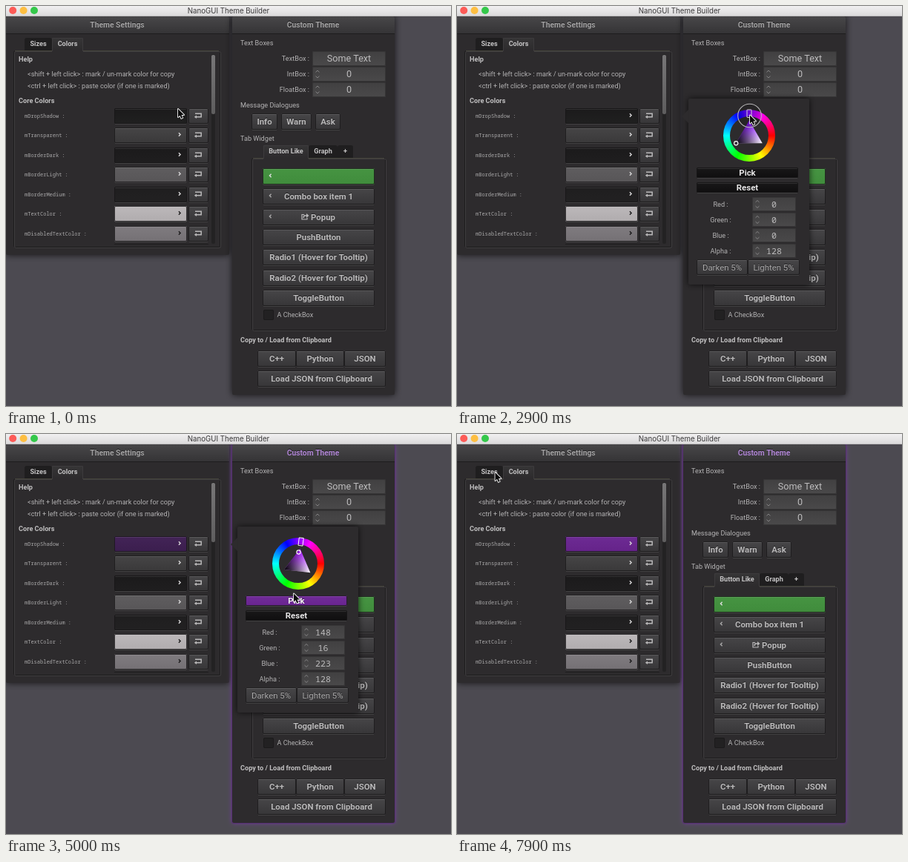
An HTML page with a canvas that plays this animation: 600x540 px, repeating every 8000 ms.

```html
<!DOCTYPE html>
<html lang="en">
<head>
<meta charset="utf-8">
<title>NanoGUI Theme Builder</title>
<style>
  html, body { margin: 0; width: 100%; height: 100%; overflow: hidden; background: #4c4a51; }
  canvas { display: block; width: 600px; height: 540px; }
</style>
</head>
<body>
<canvas id="stage"></canvas>
<script>
const LOOP = 8000, STEP = 100;
const SANS = 'Roboto, sans-serif', MONO = '"Noto Sans Mono", monospace', UI = 'Inter, sans-serif';
const canvas = document.getElementById('stage');
const c = canvas.getContext('2d');
const dpr = window.devicePixelRatio || 1;
canvas.width = 600 * dpr;
canvas.height = 540 * dpr;

// time, x, y of the pointer tip
const path = [
  [0, 232, 139], [400, 231.5, 147.5], [1200, 231.5, 147.5], [2200, 395, 147.5], [2900, 395, 147.5],
  [3500, 398, 148], [4000, 395.5, 161], [4300, 395.5, 161], [4500, 394.5, 159.5],
  [5000, 388, 215.5], [5300, 386, 220.5], [6400, 386, 220.5], [7700, 51.5, 52], [LOOP, 51.5, 52]
];
const presses = [[1000, 1300], [2800, 3600], [4200, 4600], [5300, 5500]];
const OPEN = 1000, HUE = 2800, PICK = 4300, CLOSE = 5500;
const WHEEL = { x: 394, y: 175, outer: 35, inner: 26, tri: 20.5 };

const within = (t, a, b) => t >= a && t < b;
const ease = u => u * u * (3 - 2 * u);

function pointerAt(t) {
  const i = Math.max(1, path.findIndex(p => p[0] > t));
  const [t0, x0, y0] = path[i - 1], [t1, x1, y1] = path[i];
  const u = ease((t - t0) / (t1 - t0));
  return [x0 + (x1 - x0) * u, y0 + (y1 - y0) * u];
}

function blend([x0, y0], [x1, y1], from, to) {
  const g = c.createLinearGradient(x0, y0, x1, y1);
  g.addColorStop(0, from);
  g.addColorStop(1, to);
  return g;
}

const fade = (y0, y1, top, bottom) => blend([0, y0], [0, y1], top, bottom);

function box(x0, y0, x1, y1, fill, r = 0) {
  c.beginPath();
  c.roundRect(x0, y0, x1 - x0, y1 - y0, r);
  c.fillStyle = fill;
  c.fill();
}

function outline(x0, y0, x1, y1, color, r = 1.5) {
  c.beginPath();
  c.roundRect(x0 + .5, y0 + .5, x1 - x0 - 1, y1 - y0 - 1, r);
  c.strokeStyle = color;
  c.lineWidth = 1;
  c.stroke();
}

// y is the middle of the capital letters
function text(s, x, y, size, { color = '#b4b3b4', weight = 400, align = 'left', font = SANS, shade } = {}) {
  c.font = `${weight} ${size}px ${font}`;
  c.textAlign = align;
  const base = y + size * .355;
  if (shade) {
    c.fillStyle = shade;
    c.fillText(s, x, base - .7);
  }
  c.fillStyle = color;
  c.fillText(s, x, base);
}

const label = (s, x, y, o) => text(s, x, y, 9.15, o);
const head = (s, x, y) => label(s, x, y, { weight: 700, color: '#c2c1c2' });

function line(points, color, width = 1) {
  c.beginPath();
  points.forEach(([x, y]) => c.lineTo(x, y));
  c.strokeStyle = color;
  c.lineWidth = width;
  c.stroke();
}

function chevron(x, y, dir, color, size = 2.2) {
  line([[x - dir * size / 2, y - size], [x + dir * size / 2, y], [x - dir * size / 2, y + size]], color, 1.4);
}

function button(x0, y0, x1, y1, s, { top = '#474648', bottom = '#373638', weight = 700, cx = (x0 + x1) / 2, color = '#b9b8b9' } = {}) {
  box(x0, y0, x1, y1, fade(y0, y1, top, bottom), 2);
  line([[x0 + 1, y0 + 1.5], [x1 - 1, y0 + 1.5]], 'rgba(255,255,255,.1)');
  outline(x0, y0, x1, y1, 'rgba(24,23,24,.8)');
  line([[x0 + 1, y1 + .5], [x1 - 1, y1 + .5]], 'rgba(255,255,255,.1)');
  if (s) text(s, cx, (y0 + y1) / 2, 11.4, { weight, align: 'center', color, shade: 'rgba(0,0,0,.5)' });
}

function field(x0, y0, x1, y1, s, { spin = false, font = SANS, size = 12.6 } = {}) {
  box(x0, y0, x1, y1, fade(y0, y1, '#414041', '#4a494a'), 2);
  outline(x0, y0, x1, y1, '#363536');
  const y = (y0 + y1) / 2;
  text(s, (x0 + x1) / 2, y, size, { align: 'center', color: '#bdbcbd', font });
  if (spin) for (const d of [-1, 1]) {
    line([[x0 + 4.5, y + d * 2.6], [x0 + 7, y + d * 5], [x0 + 9.5, y + d * 2.6]], '#858485');
  }
}

function win(x0, y0, x1, y1, title, color, glow) {
  c.save();
  c.shadowColor = glow ? '#7a36b0' : 'rgba(0,0,0,.75)';
  c.shadowBlur = (glow ? 6 : 10) * dpr;
  box(x0, y0, x1, y1, '#2d2b2d', 2);
  c.restore();
  if (glow) outline(x0 - 1, y0, x1 + 1, y1 + 1, '#573073');
  box(x0, y0, x1, y0 + 23, fade(y0, y0 + 23, '#484749', '#353436'), [2, 2, 0, 0]);
  line([[x0, y0 + 23.5], [x1, y0 + 23.5]], '#1d1c1d');
  text(title, (x0 + x1) / 2 - .5, y0 + 11, 10.3, { weight: 700, align: 'center', color, shade: 'rgba(0,0,0,.6)' });
}

// tabs: [text, left, right]; active is the raised one
function tabs(x0, y0, x1, y1, list, active) {
  outline(x0, y0, x1, y1, '#1d1c1d', 2);
  outline(x0 + 1, y0 + 1, x1 + 1, y1 + 1, '#403e40', 2);
  list.forEach(([s, l, r], i) => {
    const on = i === active;
    box(l, y0 - 17, r, y0 + (on ? 2 : 0), on ? fade(y0 - 17, y0, '#363536', '#2d2b2d') : '#1f1e1f', [3, 3, 0, 0]);
    if (on) line([[l + .5, y0 + 1], [l + .5, y0 - 16.5], [r - .5, y0 - 16.5], [r - .5, y0 + 1]], '#3d3b3d');
    label(s, (l + r) / 2, y0 - 9, { weight: 700, align: 'center', color: '#c4c3c4' });
  });
  line([[x0 + 2, y0 + .5], [list[active][1], y0 + .5]], '#45443b');
  line([[list[active][2], y0 + .5], [x1 - 2, y0 + .5]], '#45443b');
}

function arrowhead(x, y, dir, w, h) {
  c.beginPath();
  [[0, -h], [dir * w, 0], [0, h]].forEach(([dx, dy]) => c.lineTo(x + dx, y + dy));
  c.fillStyle = '#b9b8b9';
  c.fill();
}

function backIcon(x, y) {
  line([[x - 4, y - 2.7], [x + 4.2, y - 2.7], [x + 4.2, y + 1.8], [x - 2.5, y + 1.8]], '#b9b8b9', 1.5);
  arrowhead(x - 2, y + 1.8, -1, 3.2, 2.3);
}

function shareIcon(x, y) {
  line([[x - 1, y - 2.5], [x - 4, y - 2.5], [x - 4, y + 4], [x + 3, y + 4], [x + 3, y + 2]], '#b9b8b9', 1.2);
  line([[x - 2, y + 2], [x - 1, y - 1], [x + 3, y - 1]], '#b9b8b9', 1.5);
  arrowhead(x + 2, y - 1, 1, 3.5, 3);
}

function titleBar() {
  box(0, 0, 600, 14, fade(0, 14, '#f1f0f1', '#dad9da'));
  line([[0, 13.5], [600, 13.5]], '#bdbcbd');
  ['#fc5b57', '#fdbe41', '#34c84a'].forEach((color, i) => {
    c.beginPath();
    c.arc(9.2 + i * 14.4, 6, 5, 0, 7);
    c.fillStyle = color;
    c.fill();
  });
  text('NanoGUI Theme Builder', 300, 6.3, 9.7, { align: 'center', font: UI, color: '#3b3a3b' });
}

function settings(t) {
  win(0, 14, 301, 336, 'Theme Settings', within(t, OPEN, HUE) ? '#dedddf' : '#a3a2a3');
  tabs(10, 60, 289, 326, [['Sizes', 25, 62], ['Colors', 62, 104]], 1);
  head('Help', 17, 72);
  label('<shift + left click> : mark / un-mark color for copy', 29, 92);
  label('<ctrl + left click> : paste color (if one is marked)', 29, 108);
  head('Core Colors', 17, 127.5);
  box(277, 65, 282, 321, '#232223', 2);
  box(277, 66, 282, 146, fade(66, 146, '#777677', '#5e5d5e'), 2);

  const drop = t >= CLOSE ? ['#6d2b94', '#652389'] : t >= PICK ? ['#432457', '#3b1e4e'] : ['#1b1a1b', '#202020'];
  const rows = [
    ['mDropShadow', ...drop], ['mTransparent', '#464546', '#3a393a'], ['mBorderDark', '#1b1a1b', '#1f1e1f'],
    ['mBorderLight', '#5f5d5f', '#585658'], ['mBorderMedium', '#1f1e1f', '#222122'],
    ['mTextColor', '#bcb8ba', '#b0acae'], ['mDisabledTextColor', '#807c80', '#747074']
  ];
  rows.forEach(([name, top, bottom], i) => {
    const y = Math.round(147.9 + 26.5 * i);
    text(name + ' :', 25, y + .5, 7, { font: MONO, color: '#a9a8a9' });
    button(146, y - 10, 244, y + 11, '', { top, bottom });
    chevron(234, y - .5, 1, i > 4 ? '#1a191a' : '#d8d7d8');
    button(246, y - 10, 273, y + 11);
    backIcon(259, y);
  });
  line([[146, 321.5], [273, 321.5]], '#1e1d1e');
}

function custom(t) {
  const purple = t >= PICK;
  win(305, 14, 524, 525, 'Custom Theme', purple ? '#b086d4' : '#a3a2a3', purple);
  label('Text Boxes', 316, 49.5);
  [['TextBox :', 'Some Text'], ['IntBox :', '0'], ['FloatBox :', '0']].forEach(([name, value], i) => {
    const y = Math.round(71 + 21.2 * i);
    label(name, 409, y, { align: 'right' });
    field(413, y - 10, 512, y + 10, value, { spin: i > 0 });
  });
  label('Message Dialogues', 316, 134);
  button(331, 145, 366, 167, 'Info');
  button(371, 145, 412, 167, 'Warn');
  button(417, 145, 451, 167, 'Ask');
  label('Tab Widget', 316, 178.5);
  tabs(331, 205, 512, 438, [['Button Like', 347, 408], ['Graph', 408, 447], ['+', 447, 468]], 0);

  const stack = ['', 'Combo box item 1', 'Popup', 'PushButton', 'Radio1 (Hover for Tooltip)', 'Radio2 (Hover for Tooltip)', 'ToggleButton'];
  stack.forEach((s, i) => {
    const y = Math.round(219 + 27.3 * i);
    const look = i ? {} : { top: '#469442', bottom: '#408c3c' };
    button(346, y, 497, y + 22, s, { ...look, cx: i === 2 ? 427.5 : 421.5 });
    if (i < 3) chevron(356.5, y + 10, -1, i ? '#a9a8a9' : '#dedede');
  });
  shareIcon(403, 284);
  box(347, 410, 361, 424, '#222122', 2);
  outline(347, 410, 361, 424, '#1b1a1b');
  label('A CheckBox', 365.5, 417);

  head('Copy to / Load from Clipboard', 316, 450.5);
  button(339, 465, 391, 487, 'C++');
  button(391, 465, 456, 487, 'Python');
  button(456, 465, 512, 487, 'JSON');
  button(339, 492, 512, 514, 'Load JSON from Clipboard');
}

function wheel(t, angle) {
  const { x, y, outer, inner, tri } = WHEEL;
  const ring = c.createConicGradient(0, x, y);
  for (let h = 0; h <= 360; h += 60) ring.addColorStop(h / 360, `hsl(${h},100%,50%)`);
  c.beginPath();
  c.arc(x, y, (outer + inner) / 2, 0, 7);
  c.strokeStyle = ring;
  c.lineWidth = outer - inner;
  c.stroke();

  const corner = turn => [x + tri * Math.cos(angle + turn), y + tri * Math.sin(angle + turn)];
  const third = Math.PI * 2 / 3;
  const tip = corner(0), white = corner(third), black = corner(-third);
  const middle = [(tip[0] + white[0]) / 2, (tip[1] + white[1]) / 2];
  const hue = (angle * 180 / Math.PI + 360) % 360;
  c.beginPath();
  [tip, white, black].forEach(p => c.lineTo(...p));
  c.closePath();
  c.fillStyle = blend(tip, white, `hsl(${hue},100%,50%)`, '#fff');
  c.fill();
  c.fillStyle = blend(middle, black, 'rgba(0,0,0,0)', '#000');
  c.fill();

  c.save();
  c.translate(x, y);
  c.rotate(angle);
  outline(24, -3.5, 35.5, 3.5, '#fff', .5);
  c.restore();

  const [mx, my] = t >= PICK ? [394.5, 159.5] : black;
  c.beginPath();
  c.arc(mx, my, 2.6, 0, 7);
  c.strokeStyle = '#fff';
  c.lineWidth = 1.1;
  c.stroke();
}

function popup(t) {
  const picked = t >= PICK;
  c.save();
  c.shadowColor = 'rgba(0,0,0,.75)';
  c.shadowBlur = 9 * dpr;
  box(312, 125, 475, 376, '#2d2b2d', 2);
  c.restore();
  c.beginPath();
  c.moveTo(303, 149);
  c.lineTo(312.5, 139.5);
  c.lineTo(312.5, 158.5);
  c.fillStyle = '#2d2b2d';
  c.fill();

  let angle = 0;
  if (t >= HUE) {
    const u = Math.min(1, Math.max(0, (t - 2900) / 600));
    angle = (-90 + 7 * ease(u)) * Math.PI / 180;
  }
  wheel(t, angle);

  const dark = { top: '#191819', bottom: '#0f0e0f', color: '#e8e7e8' };
  const chosen = { top: '#712c98', bottom: '#692590', color: '#f0eff0' };
  button(323, 218, 460, 232, 'Pick', picked ? chosen : dark);
  button(323, 238, 460, 252, 'Reset', dark);
  const values = picked ? [148, 16, 223, 128] : [0, 0, 0, 128];
  ['Red', 'Green', 'Blue', 'Alpha'].forEach((name, i) => {
    const y = Math.round(267.5 + 21.2 * i);
    label(name + ' :', 355.5, y - .5, { align: 'center' });
    field(398, y - 10, 457, y + 9, String(values[i]), { spin: true, font: MONO, size: 11.6 });
  });
  button(323, 342, 392, 363, 'Darken 5%', { weight: 400, color: '#a9a8a9' });
  button(392, 342, 462, 363, 'Lighten 5%', { weight: 400, color: '#a9a8a9' });
}

function pointer([x, y], pressed) {
  if (pressed) {
    c.beginPath();
    c.arc(x - .5, y + .5, 15.8, 0, 7);
    c.fillStyle = 'rgba(0,0,0,.16)';
    c.fill();
    c.strokeStyle = '#b9b8b9';
    c.lineWidth = 1.1;
    c.stroke();
  }
  c.beginPath();
  [[0, 0], [0, 11], [2.5, 8.7], [4.3, 12.8], [6.2, 12], [4.5, 8], [8, 8]].forEach(([dx, dy]) => c.lineTo(x + dx, y + dy));
  c.closePath();
  c.lineJoin = 'round';
  c.strokeStyle = '#f2f1f2';
  c.lineWidth = 1.8;
  c.stroke();
  c.fillStyle = '#0a0a0a';
  c.fill();
  c.lineJoin = 'miter';
}

function draw(t) {
  c.setTransform(dpr, 0, 0, dpr, 0, 0);
  box(0, 0, 600, 540, '#4c4a51');
  settings(t);
  custom(t);
  if (within(t, OPEN, CLOSE)) popup(t);
  titleBar();
  pointer(pointerAt(t), presses.some(([a, b]) => within(t, a, b)));
}

const start = performance.now();
function tick() {
  const t = (performance.now() - start) % LOOP;
  draw(Math.floor(t / STEP) * STEP);
  requestAnimationFrame(tick);
}
tick();
</script>
</body>
</html>
```
